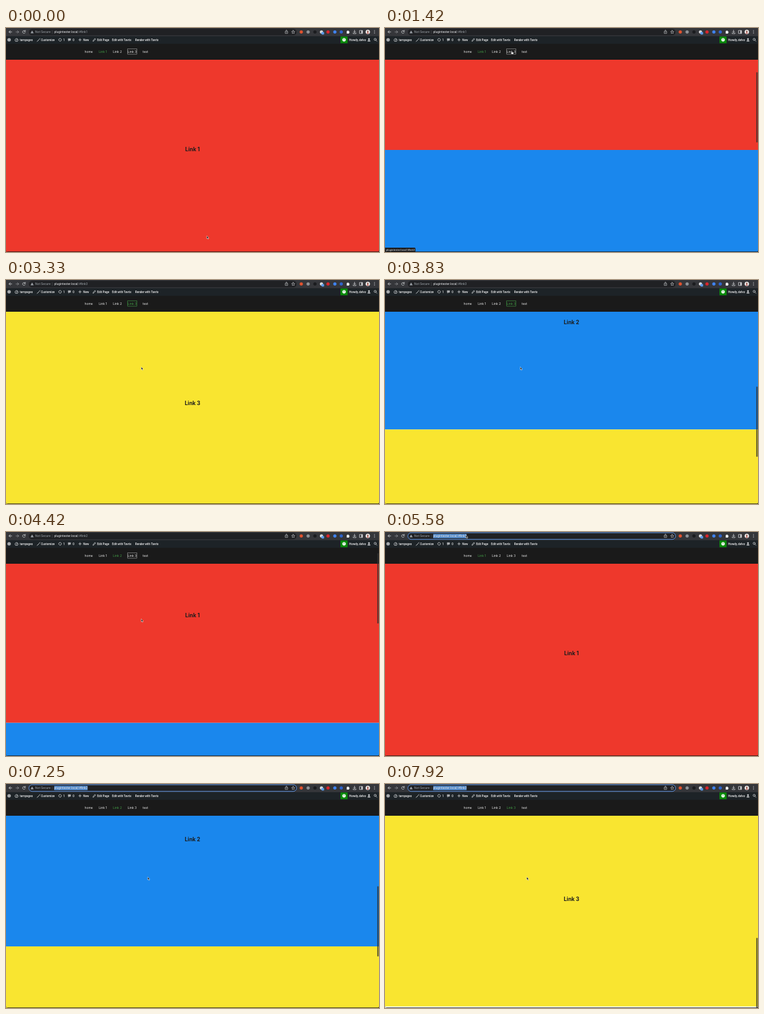
Recreate the animation shown at these times as an HTML page. Size 600 by 360 pixels, loop 8 s.

```html
<!DOCTYPE html>
<html lang="en">
<head>
<meta charset="utf-8">
<title>Smooth scroll navigation</title>
<style>
  html, body { margin: 0; width: 100%; height: 100%; overflow: hidden; background: #111; }
  svg { display: block; width: 100vw; height: 100vh; }
  text { white-space: pre; }
  .ui { font: 5px Roboto, sans-serif; fill: #e8eaed; }
  .admin { font: 500 4.6px Roboto, sans-serif; fill: #f0f0f1; }
  .nav { font: 5px Inter, sans-serif; fill: #ececec; }
  .title { font: 700 8.6px Inter, sans-serif; fill: #1c1c1c; text-anchor: middle; }
  .line { fill: none; stroke: #d5d7da; stroke-width: .8; stroke-linecap: round; stroke-linejoin: round; }
</style>
</head>
<body>
<svg viewBox="0 0 600 360" preserveAspectRatio="none">
  <rect width="600" height="360" fill="#fff"/>
  <g id="page"></g>

  <rect y="25" width="600" height="26" fill="#1a1a1a"/>
  <g id="nav" class="nav"></g>
  <rect id="focus" x="195.7" y="33.5" width="14.8" height="8.6" fill="none" stroke-width=".6"/>

  <rect y="13" width="600" height="12.5" fill="#1d2327"/>
  <g id="admin" class="admin"></g>
  <circle cx="5" cy="19" r="2.8" fill="#a7aaad"/>
  <g class="line">
    <path d="M15 21a2.5 2.5 0 1 1 4 0zM17 20l1-2"/>
    <path d="M50 21.5l1.8-1.3M52 20l2.6-3.2"/>
    <path d="M84.8 19.6a2.2 2.2 0 0 1 3.8-2M89.2 18.4a2.2 2.2 0 0 1-3.8 2"/>
    <path d="M117 19h4M119 17v4"/>
    <path d="M140 21l.5-1.6 2.6-2.6 1.1 1.1-2.6 2.6z"/>
    <circle cx="593.8" cy="18.3" r="1.7"/><path d="M595 19.6l1.6 1.7"/>
  </g>
  <path d="M99.7 16.7h4.6v3.5h-2.2l-1.5 1.5v-1.5h-.9z" fill="#a7aaad"/>
  <rect x="538" y="13.5" width="11.5" height="11" fill="#0a8a0a"/>
  <circle cx="543.8" cy="19" r="2.7" fill="#fff"/>
  <path d="M543.8 17.3v2M543.8 20.3v.4" stroke="#0a8a0a" stroke-width=".8"/>
  <path d="M581.5 21.5q0-2 2.4-2t2.4 2z" fill="#d5d7da"/><circle cx="583.9" cy="17.8" r="1.4" fill="#d5d7da"/>

  <rect width="600" height="13.2" fill="#35363a"/>
  <rect id="bar" x="36.8" y="1.2" width="430.6" height="10.6" rx="5.3" fill="#202124"/>
  <g class="line">
    <path d="M9.3 6.3H5M7 4.2L4.9 6.3 7 8.4"/>
    <path d="M16 6.3h4.3M18.3 4.2l2.1 2.1-2.1 2.1" opacity=".55"/>
    <path d="M30.8 5.2a2.2 2.2 0 1 0 .2 1.9M31 3.7v1.7h-1.7"/>
    <path d="M449.8 5.5h-.7v3.2h4v-3.2h-.7M451.1 7V3.4M450 4.4l1.1-1.1 1.1 1.1" stroke-width=".6"/>
    <path d="M462 3.8l.8 1.7 1.8.2-1.3 1.2.3 1.9-1.6-.9-1.6.9.3-1.9-1.3-1.2 1.8-.2z" stroke-width=".6"/>
    <path d="M560.7 3.4v3.7M559.2 5.8l1.5 1.5 1.5-1.5M558.4 8v1h4.6V8"/>
    <path d="M569 4h4.6v4.8H569z"/><path d="M572.4 4v4.8" stroke-width="1.8" stroke-linecap="butt"/>
  </g>
  <path d="M42 4l2.5 4.5h-5z" fill="#9aa0a6"/>
  <text class="ui" x="47" y="8.1" style="fill:#9aa0a6">Not Secure</text>
  <path d="M74.3 3.5v6" stroke="#5f6368" stroke-width=".5"/>
  <rect id="sel" y="3" height="7" fill="#4f86c6"/>
  <text id="url" class="ui" x="77.5" y="8.1"><tspan>plugintester.local</tspan><tspan id="hash"></tspan></text>
  <g id="ext"></g>
  <path d="M548 4.7h1.2a.8.8 0 0 1 1.6 0h1.2V6a.8.8 0 0 1 0 1.6v1.3h-4z" fill="#e8eaed"/>
  <circle cx="582" cy="6.3" r="3.5" fill="#eee"/><circle cx="582" cy="5.5" r="1.3" fill="#8a4a3c"/>
  <path d="M580 8.8q2-3.4 4 0z" fill="#b33a30"/>
  <g fill="#e8eaed"><circle cx="592.8" cy="4.1" r=".6"/><circle cx="592.8" cy="6.3" r=".6"/><circle cx="592.8" cy="8.5" r=".6"/></g>

  <rect id="thumb" x="597.1" width="2.4" height="113" rx="1.2" fill="#303030" fill-opacity=".72"/>
  <g id="status">
    <path d="M0 353h47.5q1.5 0 1.5 1.5V360H0z" fill="#202124"/>
    <text class="ui" x="1.8" y="358.2" style="font-size:4.3px">plugintester.local/#link3</text>
  </g>
  <path d="M0 357v3h3q-3 0-3-3zM600 357v3h-3q3 0 3-3zM0 359.3h600v.7H0z" fill="#1a1a1a"/>
  <path id="arrow" d="M0 0v4.6l1.1-1 .8 1.8.9-.4-.8-1.7h1.4z" fill="#111" stroke="#fff" stroke-width=".5"/>
  <path id="hand" d="M-.6-.8q.6-.6 1.1 0v2l2 .5q.6.3.4 1l-.5 1.9H-.3L-1.9 2.4q.3-.8 1.3 0z" fill="#fff" stroke="#111" stroke-width=".45"/>
</svg>
<script>
const LOOP = 8000, STEP = 1000 / 12;
const SECTION = 345, TOP = 22, END = 699.5, THIRD = 686.5;
const GREEN = '#43a047';
const $ = id => document.getElementById(id);
const set = (id, attrs) => { for (const k in attrs) $(id).setAttribute(k, attrs[k]); };
const label = (x, y, s, cls = '') => `<text x="${x}" y="${y}" class="${cls}">${s}</text>`;
const clamp = u => Math.min(1, Math.max(0, u));
const smooth = u => u * u * (3 - 2 * u);

$('page').innerHTML = ['#ee382c', '#1a87ed', '#f9e530'].map((c, i) => {
  const y = TOP + i * SECTION;
  return `<rect y="${y}" width="600" height="${SECTION}" fill="${c}"/>` +
    label(300, y + SECTION / 2 + 3.1, 'Link ' + (i + 1), 'title');
}).join('');

$('nav').innerHTML = [[126.5, 'home'], [149.2, 'Link 1'], [172, 'Link 2'], [195.8, 'Link 3'], [219.8, 'test']]
  .map(([x, s]) => label(x, 39.7, s)).join('');

$('admin').innerHTML = [[22.3, 'tarnpages'], [56.3, 'Customize'], [92, '1'], [107.3, '0'], [124.3, 'New'],
  [146.5, 'Edit Page'], [170.6, 'Edit with Tavrix'], [207.8, 'Render with Tavrix'], [552, 'Howdy, delvo']]
  .map(([x, s]) => label(x, 20.7, s)).join('');

$('ext').innerHTML = [[475, '#e0522f'], [486, '#8d9196'], [497, '#1b1c1f'], [507.5, '#d5d7da'],
  [518, '#d9262c'], [529, '#3f83ee'], [539.3, '#2f62c9']]
  .map(([x, c]) => `<circle cx="${x}" cy="6.3" r="2.6" fill="${c}"/>`).join('') +
  '<rect x="507.5" y="6.6" width="4.2" height="4" rx=".8" fill="#5b9bea"/>';

// time, x, y of the pointer tip
const path = [
  [0, 323, 334], [250, 269, 111.5], [420, 262, 104], [900, 160, 37], [1170, 202, 37], [1250, 204, 37.5],
  [1580, 204, 37.5], [2170, 266, 162], [2330, 262, 160], [2500, 260, 159], [3250, 217.5, 139.7],
  [5000, 217.5, 139.7], [5400, 130, 5], [5830, 130, 5], [6170, 116.5, 5], [6250, 116.5, 5],
  [6420, 228, 149.5], [LOOP, 228, 149.5]
];

function pointer(t) {
  const i = Math.max(1, path.findIndex(k => k[0] >= t));
  const [t0, x0, y0] = path[i - 1], [t1, x1, y1] = path[i];
  const u = smooth(clamp((t - t0) / (t1 - t0)));
  return [x0 + (x1 - x0) * u, y0 + (y1 - y0) * u];
}

function scrollAt(t) {
  if (t < 3345) return THIRD * smooth(clamp((t - 1190) / 696));
  if (t < 6500) return THIRD * (1 - smooth(clamp((t - 3345) / 1311)));
  return END * (1 - (1 - clamp((t - 6520) / 1330)) ** 1.3);
}

// A link turns active once its section fills the window.
function activeLink(t, s) {
  const up = t >= 3345 && t < 6500;
  return up ? Math.max(0, Math.ceil((s - 10) / SECTION)) : Math.floor((s + 10) / SECTION);
}

function thumbAlpha(t) {
  const fade = (from, to) => t < from ? 0 : 1 - clamp((t - to) / 250);
  return Math.max(fade(1240, 2480), fade(3400, 5150), fade(6560, LOOP));
}

function selection(t, active) {
  const url = $('url'), full = url.getNumberOfChars();
  const len = n => n ? url.getSubStringLength(0, n) : 0;
  if (t < 5410) return [0, 0];
  if (t < 5830 || (t > 6500 && active > 0)) return [0, len(full)];
  const from = len(full - 6), to = len(full);
  return [to - (to - from) * clamp((t - 5830) / 330), to];
}

function draw(time) {
  const t = Math.floor((time + 5) / STEP) * STEP;
  const s = scrollAt(t), active = activeLink(t, s), typing = t >= 5410;

  set('page', { transform: `translate(0 ${-s})` });
  set('thumb', { y: 14 + s / 3, opacity: thumbAlpha(t) });
  set('status', { opacity: t < 1245 ? 0 : 1 - clamp((t - 2090) / 240) });

  [...$('nav').children].forEach((el, i) => el.style.fill = i === active + 1 ? GREEN : '');
  set('focus', { stroke: active === 2 ? GREEN : '#a8a8a8', opacity: typing ? 0 : 1 });

  $('hash').textContent = '/#link' + (active + 1);
  const [a, b] = selection(t, active);
  $('hash').style.fill = b ? '#e8eaed' : '#9aa0a6';
  set('sel', { x: 77.5 + a, width: b - a });
  set('bar', { stroke: typing ? '#5e97e8' : 'none' });

  const [x, y] = pointer(t), over = y > 30 && y < 44;
  set('arrow', { transform: `translate(${x} ${y})`, opacity: over ? 0 : 1 });
  set('hand', { transform: `translate(${x} ${y})`, opacity: over ? 1 : 0 });
}

const start = performance.now();
function tick() {
  draw((performance.now() - start) % LOOP);
  requestAnimationFrame(tick);
}
tick();
</script>
</body>
</html>
```
